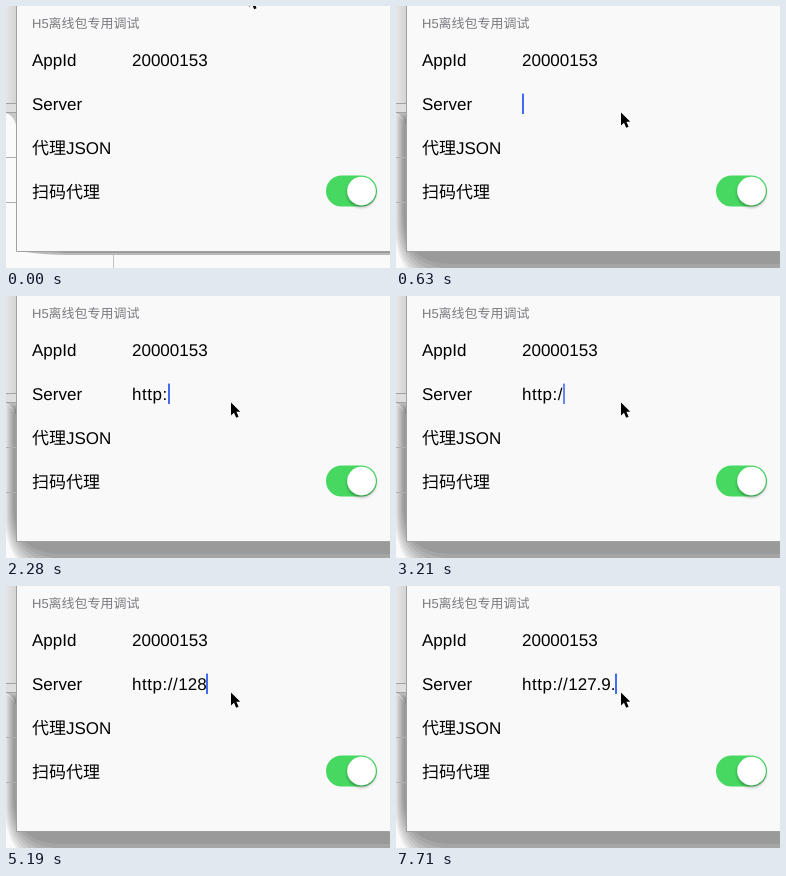
Recreate the animation shown at these times as an HTML page. Size 384 by 262 pixels, loop 8 s.

```html
<!DOCTYPE html>
<html lang="zh-CN">
<head>
<meta charset="utf-8">
<style>
  html, body { margin: 0; width: 100%; height: 100%; overflow: hidden; background: #fff; }
  svg { display: block; width: 384px; height: 262px; }
  text {
    font: 17px "Liberation Sans", "Noto Sans CJK SC", "Noto Sans CJK", sans-serif;
    text-rendering: geometricPrecision;
    white-space: pre;
  }
  .heading { font-size: 13px; fill: #7b7b80; }
  #scheme { letter-spacing: .53px; }
</style>
</head>
<body>
<svg viewBox="0 0 384 262">
  <defs>
    <linearGradient id="edge"><stop stop-color="#e6e6e6"/><stop offset="1" stop-color="#d2d2d2"/></linearGradient>
    <filter id="soft" x="-30%" y="-30%" width="160%" height="160%">
      <feDropShadow dx="0" dy="2" stdDeviation="1.5" flood-opacity=".35"/>
    </filter>
  </defs>

  <!-- Window behind the panel -->
  <rect width="384" height="262" fill="#fafafa"/>
  <rect width="11" height="97" fill="url(#edge)"/>
  <path d="M0 97.5H11M0 106.5H11" stroke="#a2a2a2"/>
  <rect y="98" width="11" height="8" fill="#dedede"/>
  <path d="M0 107Q8 109 11 122V107Z" fill="#c9c9c9"/>
  <g id="thinShadow">
    <path d="M107.5 246V262" stroke="#c4c4c4"/>
    <path d="M14 245H384V249H70Q35 249 14 245Z" fill="#b9b9b9"/>
    <path d="M30 245H384V247H60Z" fill="#999"/>
  </g>
  <g id="deepShadow"></g>
  <path d="M0 151.5H11M0 196.5H11" stroke="#b0b0b0"/>

  <!-- Panel -->
  <path d="M10.5 0V245.5H384" fill="none" stroke="#a0a0a0"/>
  <rect x="11" width="373" height="245" fill="#f9f9f9"/>
  <text class="heading" x="26" y="21.5">H5离线包专用调试</text>
  <text x="26" y="60">AppId</text>
  <text x="126" y="60">20000153</text>
  <text x="26" y="104">Server</text>
  <text x="26" y="148">代理JSON</text>
  <text x="26" y="192">扫码代理</text>
  <text id="address" x="126" y="104"><tspan id="scheme"></tspan><tspan id="host"></tspan></text>
  <rect id="caret" y="87.5" width="2" height="20.5" rx=".6" fill="#426bf2"/>

  <rect x="320" y="169.5" width="51" height="31" rx="15.5" fill="#46d860"/>
  <circle cx="355.5" cy="185" r="14.3" fill="#fff" filter="url(#soft)"/>

  <path id="pointer" d="M0 0V13L3 10.2L5.2 15.2L7.6 14.2L5.4 9.3H9.3Z" stroke="#fff" stroke-width="1.4" paint-order="stroke"/>
</svg>
<script>
const LOOP = 8000, STEP = 30;
const el = id => document.getElementById(id);

// Field contents over time
const edits = [
  [360, ''], [990, 'h'], [1290, 'ht'], [1440, 'htt'], [1560, 'http'],
  [2280, 'http:'], [2640, 'http:/'], [3300, 'http://'],
  [3780, 'http://1'], [4020, 'http://12'], [5100, 'http://128'],
  [5640, 'http://12'], [5760, 'http://127'], [6030, 'http://127.'],
  [6480, 'http://127.-'], [6690, 'http://127.-.'], [7050, 'http://127.-'],
  [7170, 'http://127.'], [7410, 'http://127.9'], [7710, 'http://127.9.']
];
const fadeOuts = [870, 2070, 3210, 4590];
const fadeIn = 5100;

// Banded shadow around the panel's lower-left corner
for (let i = 0; i < 7; i++) {
  const x = i * 1.4 - 1, bottom = 285 - i * 4.5, r = 66 - i * 3;
  const band = document.createElementNS('http://www.w3.org/2000/svg', 'path');
  band.setAttribute('d', `M${x} ${107 + i * 1.5}V${bottom - r}Q${x} ${bottom} ${x + r} ${bottom}H384V107Z`);
  band.setAttribute('fill-opacity', .065);
  el('deepShadow').append(band);
}

function caretOpacity(t, lastEdit) {
  if (t < 360) return 0;
  if (lastEdit === fadeIn) return Math.min(1, .25 + (t - fadeIn) / 120);
  const start = fadeOuts.find(f => f > lastEdit && f <= t && f - lastEdit < 600);
  return start === undefined ? 1 : Math.max(0, 1 - (t - start + STEP) / (5 * STEP));
}

function draw(now) {
  const t = Math.floor(now % LOOP / STEP) * STEP;
  const [editTime, value] = edits.findLast(([time]) => time <= t) || [0, ''];

  el('scheme').textContent = value.slice(0, 7);
  el('host').textContent = value.slice(7);
  const width = value ? el('address').getComputedTextLength() : 0;
  el('caret').setAttribute('x', Math.round(125.8 + width));
  el('caret').setAttribute('opacity', caretOpacity(t, editTime));

  const p = Math.min(1, Math.max(0, (t - 150) / 180));
  const ease = p * (2 - p);
  el('pointer').setAttribute('transform', `translate(${243 - 18 * ease} ${-12 + 118.5 * ease})`);

  const deep = t >= 630;
  el('deepShadow').style.display = deep ? '' : 'none';
  el('thinShadow').style.display = deep ? 'none' : '';
}

const origin = performance.now();
function frame() {
  draw(performance.now() - origin);
  requestAnimationFrame(frame);
}
frame();
</script>
</body>
</html>
```
